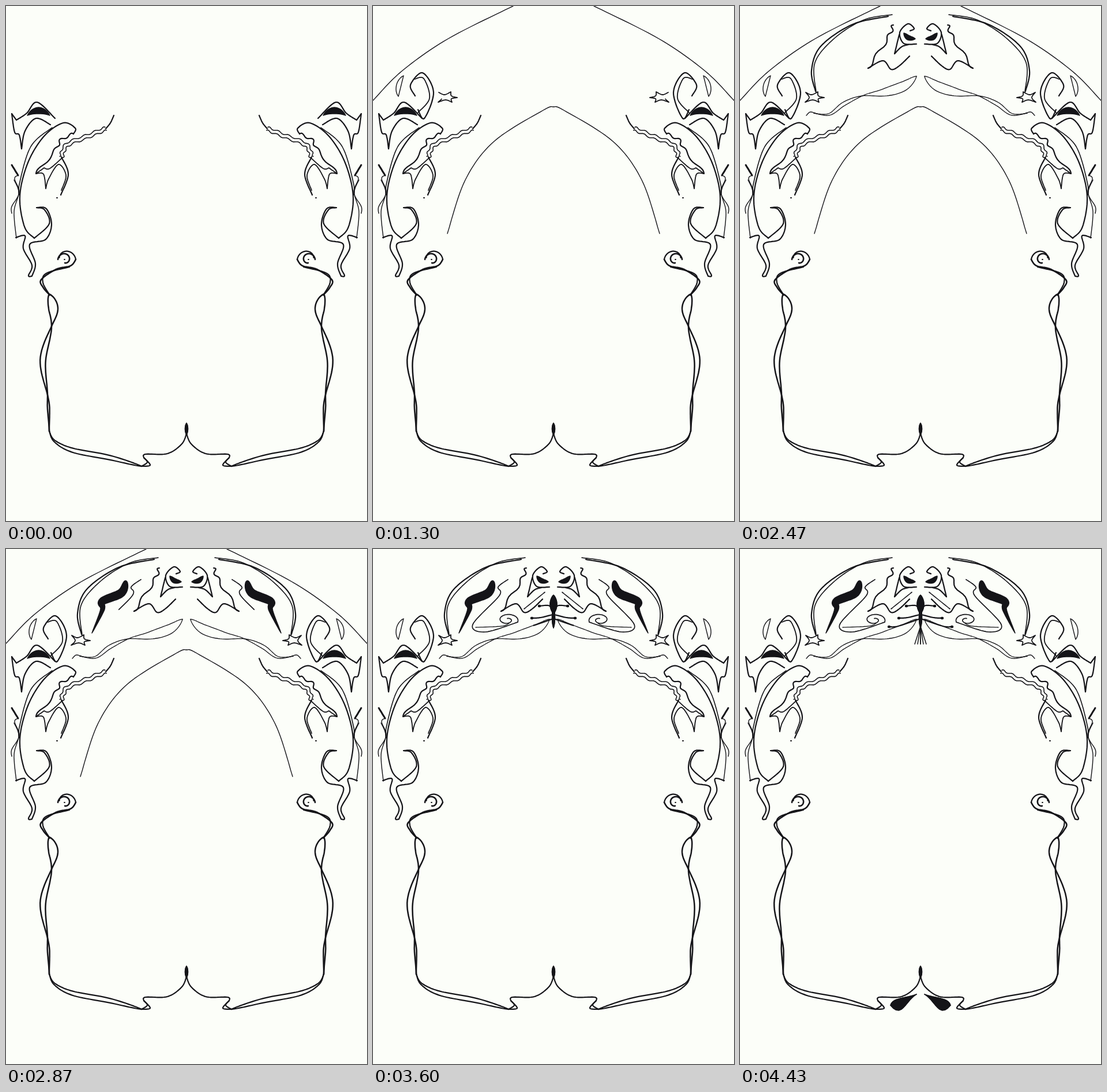
An HTML page that plays this animation: 626 by 894 pixels, repeating every 4530 ms.

```html
<!DOCTYPE html>
<html lang="en">
<head>
<meta charset="utf-8">
<title>Ornamental frame</title>
<style>
  html, body { margin: 0; width: 100%; height: 100%; overflow: hidden; background: #fcfef9; }
  svg { display: block; width: 626px; height: 894px; }
  path { stroke: #141418; fill: none; stroke-linecap: round; stroke-linejoin: round; }
</style>
</head>
<body>
<svg viewBox="0 0 626 894">
  <g id="half"></g>
  <use href="#half" transform="matrix(-1 0 0 1 626 0)"/>
</svg>
<script>
const LOOP = 4530;
const { PI, sin, cos, hypot, min, max } = Math;
const half = document.getElementById('half');
const steps = n => Array.from({ length: n + 1 }, (_, i) => i / n);

// Smooth curve through a few "x,y" points; "/" makes a sharp corner.
function trace(text) {
  const out = [];
  for (const run of text.split('/')) {
    const p = run.trim().split(/\s+/).map(s => s.split(',').map(Number));
    if (out.length) p.unshift(out.pop());
    out.push(p[0]);
    for (let i = 0; i < p.length - 1; i++) {
      const b = p[i], c = p[i + 1], a = p[i - 1] || b, d = p[i + 2] || c;
      for (const t of steps(12).slice(1)) {
        out.push([0, 1].map(k => b[k] + t / 2 * (c[k] - a[k]
          + t * (2 * a[k] - 5 * b[k] + 4 * c[k] - d[k]
          + t * (3 * b[k] - 3 * c[k] + d[k] - a[k])))));
      }
    }
  }
  return out;
}

// Moves a line sideways by shift(u), u running from 0 to 1.
function offset(line, shift) {
  const last = line.length - 1;
  return line.map(([x, y], i) => {
    const [ax, ay] = line[max(0, i - 1)], [bx, by] = line[min(last, i + 1)];
    const s = shift(i / last) / (hypot(bx - ax, by - ay) || 1);
    return [x - (by - ay) * s, y + (bx - ax) * s];
  });
}

function spiral(x, y, r0, r1, a0, a1, squash = 1) {
  return steps(40).map(t => {
    const r = r0 + (r1 - r0) * t, a = a0 + (a1 - a0) * t;
    return [x + r * cos(a), y + r * sin(a) * squash];
  });
}

// Closed shape around a spine; skew moves its widest place.
function leaf(text, left, right, skew = 1) {
  const spine = trace(text);
  const side = w => offset(spine, u => w * sin(PI * u ** skew));
  return [...side(left), ...side(right).reverse()];
}

const ink = (line, width = 2.2) => ({ line, width });
const solid = line => ({ line, width: 1.4, filled: true });

// Two strands that cross at even steps and draw closer to each other.
const ribbon = (text, amp, waves, width) => [1, -1].map(side =>
  ink(offset(trace(text), u => side * amp * (1 - u) * sin(PI * waves * u)), width));
const ripple = (text, amp, waves, shift = 0) =>
  offset(trace(text), u => shift + amp * sin(PI * waves * u));

const border = [
  // feather, eye and tongue
  ink(trace('10,187 18,198 / 36,186 54,167 85,195')),
  ink(trace('10,187 15,219 23,224 27,248 / 33,217 52,195 77,206')),
  solid(leaf('37,190 76,190', -14, -3)),
  ink(trace('49,403 32,383 24,330 38,272 66,226 99,203 120,212 117,222')),
  ink(ripple('117,222 96,232 84,252 52,291', 2.5, 7)),
  ink(trace('80,211 43,244 23,310 24,330'), 1.6),
  // branch and fork
  ink(trace('187,190 181,203 173,213')),
  ...[-3, 3].map(shift => ink(ripple('173,213 142,226 106,241 96,262', 1.5, 12, shift), 1.6)),
  ink(trace('96,262 108,292 95,328')),
  ink(trace('98,263 76,282 66,281 / 52,291 / 65,292 69,317 / 74,300 91,275 104,294 96,320'), 1.8),
  ink(trace('88,333 89,333')),
  // side ribbons and hook
  ink(trace('10,276 21,294'), 3),
  ink(trace('21,294 15,300 23,324 10,348 10,360'), 1.4),
  ink(trace('14,302 22,324 14,357 18,403'), 1.4),
  ink(trace('53,350 70,352 79,379 69,405 41,414 51,447 45,469 / 39,468 45,450 30,421 33,399 17,402')),
  ink(trace('53,350 67,354 75,378 49,403')),
  // curl, twisted stem and foot
  ink(spiral(102, 440, 12, 6, PI, 2.5 * PI), 2.6),
  ink(trace('101,440 102,440'), 1.8),
  ink(spiral(102, 440, 10, 19, 1.1 * PI, 2 * PI)),
  ink(trace('121,440 112,451 87,457 61,475 64,488 75,501'), 2.6),
  ink(trace('110,453 70,464 64,480 76,502')),
  ...ribbon('75,500 82,525 79,556 64,615 72,675 74,705 75,738', 9.6, 3, 2.5),
  ...ribbon('235,799 180,784 115,771 84,755 75,738', 7, 1),
  ink(trace('235,799 250,797 239,784 / 242,778 280,777 305,760 313,742')),
  ink(trace('235,799 245,792 239,784')),
  solid(leaf('313,724 313,744', -2.5, 2.5))
];

const guides = [
  ink(trace('243,0 130,57 50,113 0,164'), 1.4),
  ink(trace('313,175 295,181 210,235 160,302 129,395'), 1.4)
];

const sketch = [
  ink(trace('38,163 56,128 100,105 107,150 113,178 119,130 150,121 135,142 138,160 127,155 134,137')),
  ink(trace('40,160 65,143 97,161 91,194 80,182')),
  ink(trace('173,123 156,151 141,157'), 1.6)
];

const brow = [
  ink(leaf('53,121 44,157', 8, 0), 1.4),
  ink(trace('73,156 65,137 86,116 105,150 89,195 78,180')),
  ink(trace('72,127 88,126 98,160 78,185'), 1.8),
  ink(trace('114,150 / 124,154 135,149 / 136,156 146,159 / 136,161 137,167 / 126,163 113,167 / 120,159 114,150'), 1.8),
  ink(trace('257,18 195,32 140,70 124,112 131,148')),
  ...ribbon('306,122 284,139 250,150 212,156 180,170 155,188 128,186', 11, 2, 1.3),
  ink(trace('133,187 122,184 115,190'), 1.4)
];

const snout = [
  ink(trace('264,15 215,24 165,55 130,98 132,150'), 1.6),
  ink(trace('295,43 302,39 291,31 277,46 284,65 306,66')),
  solid(leaf('284,47 292,55 304,57', 4, -4)),
  ink(trace('276,50 268,83 / 280,71 292,67')),
  ink(ripple('266,33 255,58 222,108', 3, 6)),
  ink(trace('222,108 248,95 262,110 276,104 294,87'))
];

const temple = [
  solid(leaf('208,55 200,76 167,91 167,106 149,146', 7, -7, 0.6)),
  ink(trace('234,53 217,66 219,81 173,131 195,144 251,127'), 1.7),
  ink(spiral(233, 123, 19, 4, 0.1 * PI, -2.5 * PI, 0.6), 1.7),
  ink(trace('178,136 222,134 236,129'), 1.3),
  ink(trace('262,104 298,75'), 1.6)
];

const insect = [
  solid(leaf('313,80 313,112', -6, 6)),
  solid(leaf('313,100 313,137', -2.5, 2.5)),
  ...[[288, 99], [275, 120], [258, 135]].flatMap(([x, y]) => [
    ink(trace(`311,${y / 2 + 54} ${x + 16},${y - 1} ${x},${y}`)),
    ink(trace(`${x},${y} ${x + 1},${y}`), 4.5)
  ]),
  ...[303, 308, 313].map(x => ink(trace(`313,134 ${x},165`), 1.5))
];

const drop = leaf('306,773 261,792', 5, -14, 2);

const parts = [];

// Strokes follow one another from start to end and vanish at gone.
function draw(strokes, start, end, gone = LOOP) {
  const added = strokes.map(({ line, width, filled }) => {
    const path = document.createElementNS('http://www.w3.org/2000/svg', 'path');
    path.setAttribute('d', 'M' + line.map(p => p.map(v => v.toFixed(1))).join('L'));
    path.style.strokeWidth = width;
    half.append(path);
    const length = path.getTotalLength();
    path.setAttribute('pathLength', 1);
    return { path, filled, length, gone };
  });
  const total = added.reduce((sum, part) => sum + part.length, 0);
  let at = start;
  for (const part of added) {
    part.from = at;
    at += (end - start) * part.length / total;
    part.to = at;
  }
  parts.push(...added);
}

draw(border, -2, -1);
draw(guides, 200, 480, 2900);
draw(sketch, 480, 765, 1000);
draw(brow, 1000, 1765);
draw(snout, 1800, 2465);
draw(temple, 2500, 3225);
draw(insect, 3270, 3760);
draw([ink(drop, 1.6)], 3760, 3925);
draw([solid(drop)], 4180, 4181);

function show(now) {
  const t = now % LOOP;
  for (const { path, filled, from, to, gone } of parts) {
    const done = min(1, (t - from) / (to - from));
    path.style.display = done > 0 && t < gone ? '' : 'none';
    path.style.strokeDasharray = done < 1 ? `${max(0, done)} 2` : 'none';
    path.style.fill = filled && done >= 1 ? '#141418' : 'none';
  }
}

const begin = performance.now();
function tick() {
  show(performance.now() - begin);
  requestAnimationFrame(tick);
}
tick();
</script>
</body>
</html>
```
